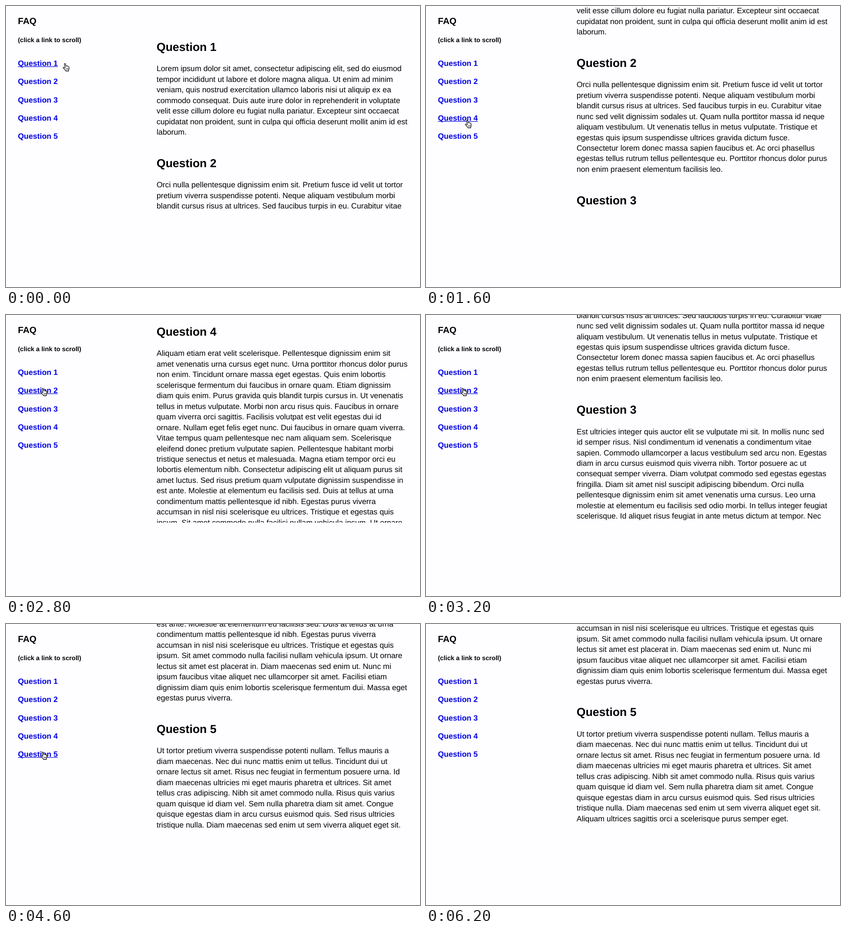
Write an HTML page with a canvas that moves like this. It is 800 by 544 pixels and loops after 6.6 s.

```html
<!DOCTYPE html>
<html lang="en">
<head>
<meta charset="utf-8">
<title>FAQ</title>
<style>
  html, body { margin: 0; width: 100%; height: 100%; overflow: hidden; background: #fefdff; }
  canvas { display: block; }
</style>
</head>
<body>
<canvas id="stage" width="800" height="544"></canvas>
<script>
const ctx = document.getElementById('stage').getContext('2d');
const LOOP = 6600, STEP = 200;
const PANE = { x: 291, height: 402, line: 20.48, headGap: 41.9, tailGap: 60.2, top: 79 };
const LINK = { x: 23, y: 110.5, pitch: 35.4 };

const answers = [
`Lorem ipsum dolor sit amet, consectetur adipiscing elit, sed do eiusmod
tempor incididunt ut labore et dolore magna aliqua. Ut enim ad minim
veniam, quis nostrud exercitation ullamco laboris nisi ut aliquip ex ea
commodo consequat. Duis aute irure dolor in reprehenderit in voluptate
velit esse cillum dolore eu fugiat nulla pariatur. Excepteur sint occaecat
cupidatat non proident, sunt in culpa qui officia deserunt mollit anim id est
laborum.`,
`Orci nulla pellentesque dignissim enim sit. Pretium fusce id velit ut tortor
pretium viverra suspendisse potenti. Neque aliquam vestibulum morbi
blandit cursus risus at ultrices. Sed faucibus turpis in eu. Curabitur vitae
nunc sed velit dignissim sodales ut. Quam nulla porttitor massa id neque
aliquam vestibulum. Ut venenatis tellus in metus vulputate. Tristique et
egestas quis ipsum suspendisse ultrices gravida dictum fusce.
Consectetur lorem donec massa sapien faucibus et. Ac orci phasellus
egestas tellus rutrum tellus pellentesque eu. Porttitor rhoncus dolor purus
non enim praesent elementum facilisis leo.`,
`Est ultricies integer quis auctor elit se vulputate mi sit. In mollis nunc sed
id semper risus. Nisl condimentum id venenatis a condimentum vitae
sapien. Commodo ullamcorper a lacus vestibulum sed arcu non. Egestas
diam in arcu cursus euismod quis viverra nibh. Tortor posuere ac ut
consequat semper viverra. Diam volutpat commodo sed egestas egestas
fringilla. Diam sit amet nisl suscipit adipiscing bibendum. Orci nulla
pellentesque dignissim enim sit amet venenatis urna cursus. Leo urna
molestie at elementum eu facilisis sed odio morbi. In tellus integer feugiat
scelerisque. Id aliquet risus feugiat in ante metus dictum at tempor. Nec
dui nunc mattis enim ut tellus elementum sagittis vitae. Amet mattis
vulputate enim nulla aliquet porttitor lacus luctus. Viverra nam libero justo
laoreet sit amet cursus. Pulvinar mattis nunc sed blandit libero volutpat
sed. Vitae suscipit tellus mauris a diam maecenas sed enim. Faucibus et
molestie ac feugiat sed lectus vestibulum mattis. Eget nulla facilisi etiam
dignissim diam quis enim lobortis. Morbi tristique senectus et netus et
malesuada fames ac turpis. Sit amet consectetur adipiscing elit ut aliquam
purus sit. Lacus sed viverra tellus in hac habitasse platea dictumst. Urna
nunc id cursus metus aliquam eleifend mi in. Nibh praesent tristique
magna sit amet purus gravida quis blandit. Arcu vitae elementum curabitur
vitae nunc sed velit dignissim.`,
`Aliquam etiam erat velit scelerisque. Pellentesque dignissim enim sit
amet venenatis urna cursus eget nunc. Urna porttitor rhoncus dolor purus
non enim. Tincidunt ornare massa eget egestas. Quis enim lobortis
scelerisque fermentum dui faucibus in ornare quam. Etiam dignissim
diam quis enim. Purus gravida quis blandit turpis cursus in. Ut venenatis
tellus in metus vulputate. Morbi non arcu risus quis. Faucibus in ornare
quam viverra orci sagittis. Facilisis volutpat est velit egestas dui id
ornare. Nullam eget felis eget nunc. Dui faucibus in ornare quam viverra.
Vitae tempus quam pellentesque nec nam aliquam sem. Scelerisque
eleifend donec pretium vulputate sapien. Pellentesque habitant morbi
tristique senectus et netus et malesuada. Magna etiam tempor orci eu
lobortis elementum nibh. Consectetur adipiscing elit ut aliquam purus sit
amet luctus. Sed risus pretium quam vulputate dignissim suspendisse in
est ante. Molestie at elementum eu facilisis sed. Duis at tellus at urna
condimentum mattis pellentesque id nibh. Egestas purus viverra
accumsan in nisl nisi scelerisque eu ultrices. Tristique et egestas quis
ipsum. Sit amet commodo nulla facilisi nullam vehicula ipsum. Ut ornare
lectus sit amet est placerat in. Diam maecenas sed enim ut. Nunc mi
ipsum faucibus vitae aliquet nec ullamcorper sit amet. Facilisi etiam
dignissim diam quis enim lobortis scelerisque fermentum dui. Massa eget
egestas purus viverra.`,
`Ut tortor pretium viverra suspendisse potenti nullam. Tellus mauris a
diam maecenas. Nec dui nunc mattis enim ut tellus. Tincidunt dui ut
ornare lectus sit amet. Risus nec feugiat in fermentum posuere urna. Id
diam maecenas ultricies mi eget mauris pharetra et ultrices. Sit amet
tellus cras adipiscing. Nibh sit amet commodo nulla. Risus quis varius
quam quisque id diam vel. Sem nulla pharetra diam sit amet. Congue
quisque egestas diam in arcu cursus euismod quis. Sed risus ultricies
tristique nulla. Diam maecenas sed enim ut sem viverra aliquet eget sit.
Aliquam ultrices sagittis orci a scelerisque purus semper eget.`
].map(text => text.split('\n'));

// Centre of each section's heading, in scrolled content.
const headings = [];
answers.reduce((y, lines) => {
  headings.push(y);
  return y + PANE.headGap + (lines.length - 1) * PANE.line + PANE.tailGap;
}, PANE.top);

const toSection = i => headings[i] - 32;
const bottom = headings[4] - 170.5;

const scrolls = [
  { start: 1439, span: 535, from: 0, to: toSection(3) },
  { start: 2865, span: 459, from: toSection(3), to: toSection(1) },
  { start: 4103, span: 565, from: toSection(1), to: bottom }
];
const moves = [
  { start: 100, span: 1100, from: [109.5, 110.5], to: [75, 220.5] },
  { start: 2000, span: 800, from: [75, 220.5], to: [66.5, 141] },
  { start: 3400, span: 600, from: [66.5, 141], to: [66.5, 247] }
];
const CURSOR_END = 5200;

const hand = new Path2D('M4.6 7.2L3.4 2.3Q3.3.9 4.4.8Q5.3.8 5.6 1.9L6.5 5.6Q7.6 4.9 8.4 5.8' +
  'Q9.5 5.2 10.2 6.3Q11.6 6 12 7.4L12.4 10Q12.4 12 11.6 13.2L11.4 15.4H6L5.6 14.2' +
  'Q3.6 12 1.2 9.6Q.5 8.4 1.6 8Q2.6 7.8 4.6 9.6Z');
const creases = new Path2D('M7.2 10v3M8.8 10v3M10.4 10v3');

const mix = (a, b, k) => a + (b - a) * k;

// cubic-bezier(.42, 0, .58, 1)
function easeInOut(x) {
  if (x <= 0) return 0;
  if (x >= 1) return 1;
  let lo = 0, hi = 1, s;
  for (let i = 0; i < 24; i++) {
    s = (lo + hi) / 2;
    const bx = 1.26 * s * (1 - s) ** 2 + 1.74 * s * s * (1 - s) + s ** 3;
    if (bx < x) lo = s; else hi = s;
  }
  return s * s * (3 - 2 * s);
}

function active(list, t) {
  const item = list.filter(m => m.start <= t).pop() || list[0];
  return { ...item, k: easeInOut((t - item.start) / item.span) };
}

function scrollAt(t) {
  const s = active(scrolls, t);
  return mix(s.from, s.to, s.k);
}

function cursorAt(t) {
  if (t >= CURSOR_END) return null;
  const m = active(moves, t);
  return m.from.map((v, i) => mix(v, m.to[i], m.k));
}

// Draws text with its capitals centred on y.
function label(text, x, y, size, weight = 'bold', color = '#000') {
  ctx.font = `${weight} ${size}px "Liberation Sans", Arial, sans-serif`;
  ctx.textRendering = 'geometricPrecision';
  ctx.fillStyle = color;
  ctx.fillText(text, x, y + size * 0.356);
}

function drawPane(scroll) {
  ctx.save();
  ctx.beginPath();
  ctx.rect(280, 0, 520, PANE.height);
  ctx.clip();
  answers.forEach((lines, i) => {
    const y = headings[i] - scroll;
    label(`Question ${i + 1}`, PANE.x, y, 22.4);
    lines.forEach((line, n) =>
      label(line, PANE.x, y + PANE.headGap + n * PANE.line, 14.94, 'normal'));
  });
  ctx.restore();
}

function drawSidebar(cursor) {
  label('FAQ', LINK.x, 28.6, 17.47);
  label('(click a link to scroll)', LINK.x, 65.6, 12.39);
  for (let i = 0; i < 5; i++) {
    const y = LINK.y + i * LINK.pitch;
    label(`Question ${i + 1}`, LINK.x, y, 14.93, 'bold', '#0000e0');
    if (cursor && Math.abs(cursor[1] - y) < 11) {
      ctx.fillRect(LINK.x, Math.round(y + 5.3) + 1, 77, 1);
    }
  }
}

function drawCursor([x, y]) {
  ctx.save();
  ctx.translate(x, y);
  ctx.lineJoin = 'round';
  ctx.fillStyle = '#fff';
  ctx.strokeStyle = '#000';
  ctx.fill(hand);
  ctx.lineWidth = 1.1;
  ctx.stroke(hand);
  ctx.lineWidth = 0.7;
  ctx.stroke(creases);
  ctx.restore();
}

function frame(now) {
  const t = Math.floor(now % LOOP / STEP) * STEP;
  const cursor = cursorAt(t);
  ctx.fillStyle = '#fefdff';
  ctx.fillRect(0, 0, 800, 544);
  drawPane(scrollAt(t));
  drawSidebar(cursor);
  if (cursor) drawCursor(cursor);
}

let origin;
function tick(now) {
  origin ??= now;
  frame(now - origin);
  requestAnimationFrame(tick);
}
frame(0);
requestAnimationFrame(tick);
</script>
</body>
</html>
```
